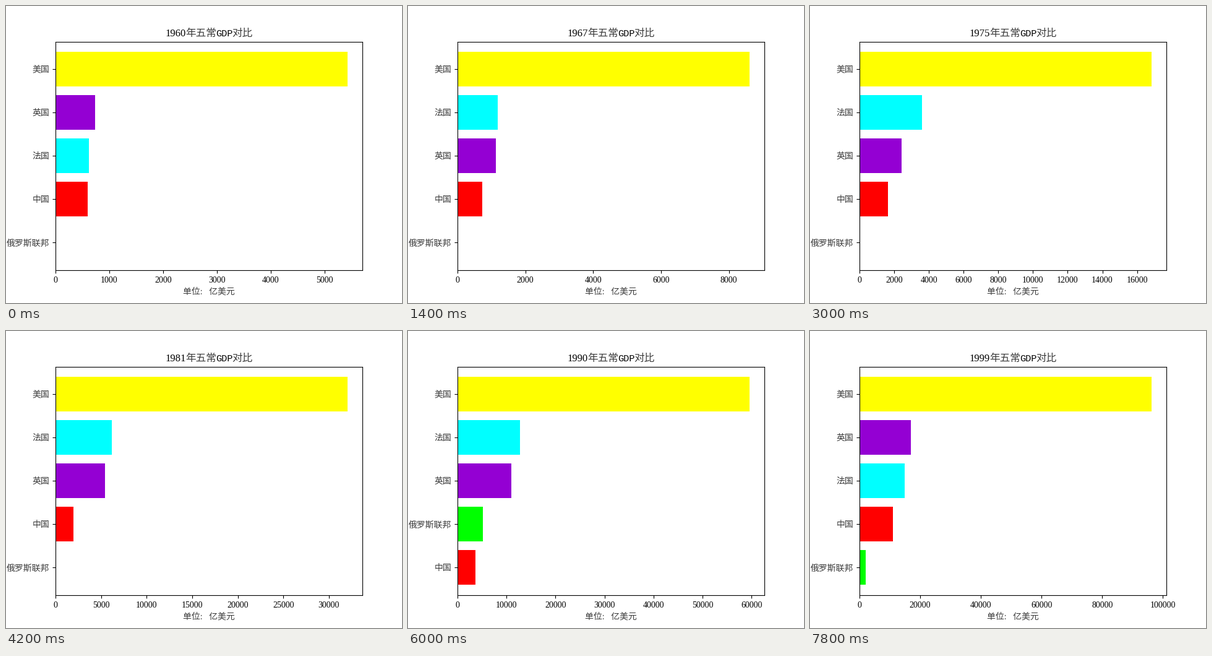
These frames come from a looping animation (640x480 px, 8 s). A matplotlib script:

```python
import numpy as np
import matplotlib.pyplot as plt
from matplotlib.animation import FuncAnimation

W, H, DPI = 640, 480, 100
START, YEARS, STEP_MS = 1960, 40, 200
INK = "#3a3a3a"  # softens the Chinese text to the look of a thin brush face

plt.rcParams["font.family"] = ["Liberation Serif", "Noto Sans CJK JP"]


def growth(**keys):
    """Yearly GDP: steady growth rates between key years, zero before the first."""
    years = [int(k[1:]) + 1900 for k in keys]
    logs = np.log(list(keys.values()))
    return np.exp(np.interp(START + np.arange(YEARS), years, logs, left=-np.inf))


# Key values in units of 100 million US dollars
COUNTRIES = [
    ("俄罗斯联邦", "#00ff00",
     growth(y88=5547, y90=5168, y93=4351, y95=3951, y97=4049, y99=1959)),
    ("中国", "#ff0000",
     growth(y60=597, y62=472, y67=729, y75=1634, y81=1959, y85=3095,
            y87=2730, y90=3609, y93=4447, y95=7345, y99=10940)),
    ("法国", "#00ffff",
     growth(y60=622, y67=1185, y71=1660, y75=3608, y77=4103, y80=7013,
            y81=6156, y85=5533, y87=9342, y90=12692, y95=16012, y97=14529,
            y99=14926)),
    ("英国", "#9400d3",
     growth(y60=732, y67=1132, y75=2418, y77=2631, y80=5649, y81=5407,
            y85=4893, y90=10932, y95=13412, y99=16874)),
    ("美国", "#ffff00",
     growth(y60=5433, y67=8617, y75=16849, y81=32070, y90=59631,
            y95=76397, y99=96312)),
]

fig, ax = plt.subplots(figsize=(W / DPI, H / DPI), dpi=DPI)


def put(x, y, text, size, **kw):
    """Place text with its baseline at pixel (x, y), measured from top left."""
    return fig.text(x / W, 1 - y / H, text, fontsize=size, va="baseline", **kw)


# The title is set on a grid of half-em Latin and full-em Chinese cells.
EM = 12 * DPI / 72
left = 328 - 4.25 * EM
year_text = put(left, 49.3, "", 12)
put(left + 2 * EM, 49.3, "年五常", 12, color=INK)
put(left + 5.75 * EM, 49.3, "GDP", 11, family="Liberation Mono", ha="center")
put(left + 6.5 * EM, 49.3, "对比", 12, color=INK)
put(328, 466, "单位:   亿美元", 10, ha="center", color=INK)


def draw(i):
    rows = sorted(COUNTRIES, key=lambda c: c[2][i])
    names, colors, series = zip(*rows)
    ax.clear()
    ax.barh(names, [s[i] for s in series], color=colors)
    ax.tick_params(axis="y", labelcolor=INK)
    year_text.set_text(str(START + i))
    return []


anim = FuncAnimation(fig, draw, frames=YEARS, init_func=lambda: draw(0),
                     interval=STEP_MS, repeat=True, repeat_delay=0)
plt.show()
```
